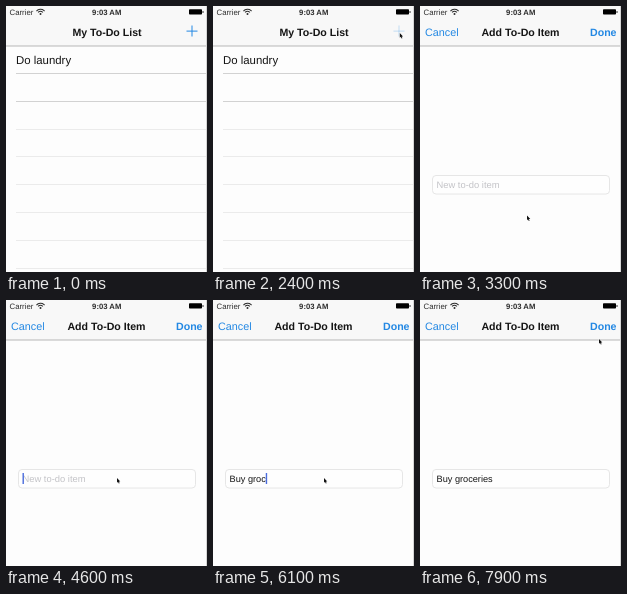
Write an HTML page with a canvas that moves like this. It is 201 px wide and 266 px high and loops after 8 s.

```html
<!DOCTYPE html>
<html lang="en">
<head>
<meta charset="utf-8">
<title>To-do list</title>
<style>
  html, body { margin: 0; width: 100%; height: 100%; overflow: hidden; background: #fdfdfd; }
  canvas { display: block; width: 201px; height: 266px; }
</style>
</head>
<body>
<canvas id="stage"></canvas>
<script>
const W = 201, H = 266, LOOP = 8000, STEP = 100;
const BLUE = '#2388e3', INK = '#151515', STATUS = '#2c2c2c';
const canvas = document.getElementById('stage');
const ctx = canvas.getContext('2d');
const ratio = window.devicePixelRatio || 1;
canvas.width = W * ratio;
canvas.height = H * ratio;
ctx.textRendering = 'geometricPrecision';

const ENTRY = 'Buy groceries';
const SLIDE_START = 2420, PRESS = [2300, 2500];
const FOCUS = 4200, TYPE_START = 5000, KEY_TIME = 150;

// Pointer keys: time, x, y
const POINTER = [
  [1600, 203, 60], [2100, 186.8, 27], [2750, 186.8, 27], [3200, 107, 209.5],
  [3350, 107, 209.5], [3600, 111, 178], [7250, 111, 178], [7900, 179, 39]
];

const smooth = u => u * u * (3 - 2 * u);

function pointerAt(t) {
  if (t < POINTER[0][0]) return null;
  for (let i = 1; i < POINTER.length; i++) {
    const [t0, x0, y0] = POINTER[i - 1], [t1, x1, y1] = POINTER[i];
    if (t <= t1) {
      const u = smooth((t - t0) / (t1 - t0));
      return [x0 + (x1 - x0) * u, y0 + (y1 - y0) * u];
    }
  }
  return POINTER[POINTER.length - 1].slice(1);
}

function rect(x, y, w, h, color) {
  ctx.fillStyle = color;
  ctx.fillRect(x, y, w, h);
}

function label(str, x, y, size, color = INK, bold = false, align = 'left') {
  ctx.font = `${bold ? 'bold ' : ''}${size}px "Liberation Sans", Arial, sans-serif`;
  ctx.textAlign = align;
  ctx.fillStyle = color;
  ctx.fillText(str, x, y);
}

function navBar(title, x) {
  rect(0, 0, W, H, '#fdfdfd');
  rect(0, 0, W, 40, '#f8f8f8');
  rect(0, 39.5, W, 1, '#b8b8b8');
  label(title, x, 29.9, 10.6, INK, true, 'center');
}

function listView(pressed) {
  navBar('My To-Do List', 101);
  ctx.globalAlpha = pressed ? 0.25 : 1;
  rect(180.5, 24.6, 11, 1, BLUE);
  rect(185.5, 19.5, 1, 11, BLUE);
  ctx.globalAlpha = 1;
  label('Do laundry', 10, 57.6, 11.4);
  for (let i = 0; i < 8; i++) {
    rect(10, Math.round(67 + i * 27.8), W - 10, 1, i < 2 ? '#d2d2d2' : '#ebebeb');
  }
}

function formView(t) {
  navBar('Add To-Do Item', 100.5);
  label('Cancel', 5, 29.9, 10.8, BLUE);
  label('Done', 196.5, 29.9, 10.6, BLUE, true, 'right');

  ctx.beginPath();
  ctx.roundRect(12.5, 169.5, 177, 18.5, 3.5);
  ctx.fillStyle = '#fefefe';
  ctx.fill();
  ctx.strokeStyle = '#e6e6e6';
  ctx.lineWidth = 1;
  ctx.stroke();

  const count = Math.max(0, Math.min(ENTRY.length, Math.floor((t - TYPE_START) / KEY_TIME) + 1));
  const typed = ENTRY.slice(0, count);
  if (count) label(typed, 16.5, 181.8, 9.2);
  else label('New to-do item', 16.5, 181.8, 9.4, '#c3c3c7');

  const typing = count > 0 && count < ENTRY.length;
  const blinkOn = t % 1000 >= 100 && t % 1000 < 700;
  if (t >= FOCUS && (typing || blinkOn)) {
    const end = count ? ctx.measureText(typed).width : 0;
    rect(16.5 + end, 173, 1.4, 11, '#4a6cdd');
  }
}

function statusBar() {
  label('Carrier', 3.5, 8.7, 7.8, STATUS);
  label('9:03 AM', 100.7, 8.7, 7.7, STATUS, true, 'center');
  ctx.strokeStyle = STATUS;
  ctx.lineWidth = 1.1;
  for (const r of [3.2, 5.4]) {
    ctx.beginPath();
    ctx.arc(34.5, 8.6, r, -Math.PI * 0.77, -Math.PI * 0.23);
    ctx.stroke();
  }
  ctx.beginPath();
  ctx.arc(34.5, 8, 1, 0, Math.PI * 2);
  ctx.fillStyle = STATUS;
  ctx.fill();
  ctx.beginPath();
  ctx.roundRect(183, 3.3, 13, 5.2, 0.8);
  ctx.fillStyle = '#000';
  ctx.fill();
  rect(196.5, 5, 1, 2, '#333');
}

function arrow(x, y) {
  ctx.save();
  ctx.translate(x, y);
  ctx.beginPath();
  ctx.moveTo(0, 0);
  ctx.lineTo(0, 4.7);
  ctx.lineTo(1, 3.8);
  ctx.lineTo(1.8, 5.6);
  ctx.lineTo(2.6, 5.2);
  ctx.lineTo(1.9, 3.5);
  ctx.lineTo(3.3, 3.4);
  ctx.closePath();
  ctx.strokeStyle = '#fff';
  ctx.lineWidth = 0.6;
  ctx.stroke();
  ctx.fillStyle = '#111';
  ctx.fill();
  ctx.restore();
}

function draw(t) {
  ctx.setTransform(ratio, 0, 0, ratio, 0, 0);
  listView(t >= PRESS[0] && t < PRESS[1]);
  if (t >= SLIDE_START) {
    const k = 16.5 * (t - SLIDE_START) / 1000;
    const offset = H * (1 + k) * Math.exp(-k);
    ctx.save();
    ctx.translate(0, offset < 0.3 ? 0 : offset);
    formView(t);
    ctx.restore();
  }
  statusBar();
  rect(200, 0, 1, H, '#d6d6d6');
  const p = pointerAt(t);
  if (p) arrow(p[0], p[1]);
}

function tick() {
  const t = performance.now() % LOOP;
  draw(Math.floor(t / STEP) * STEP);
  requestAnimationFrame(tick);
}
tick();
</script>
</body>
</html>
```
